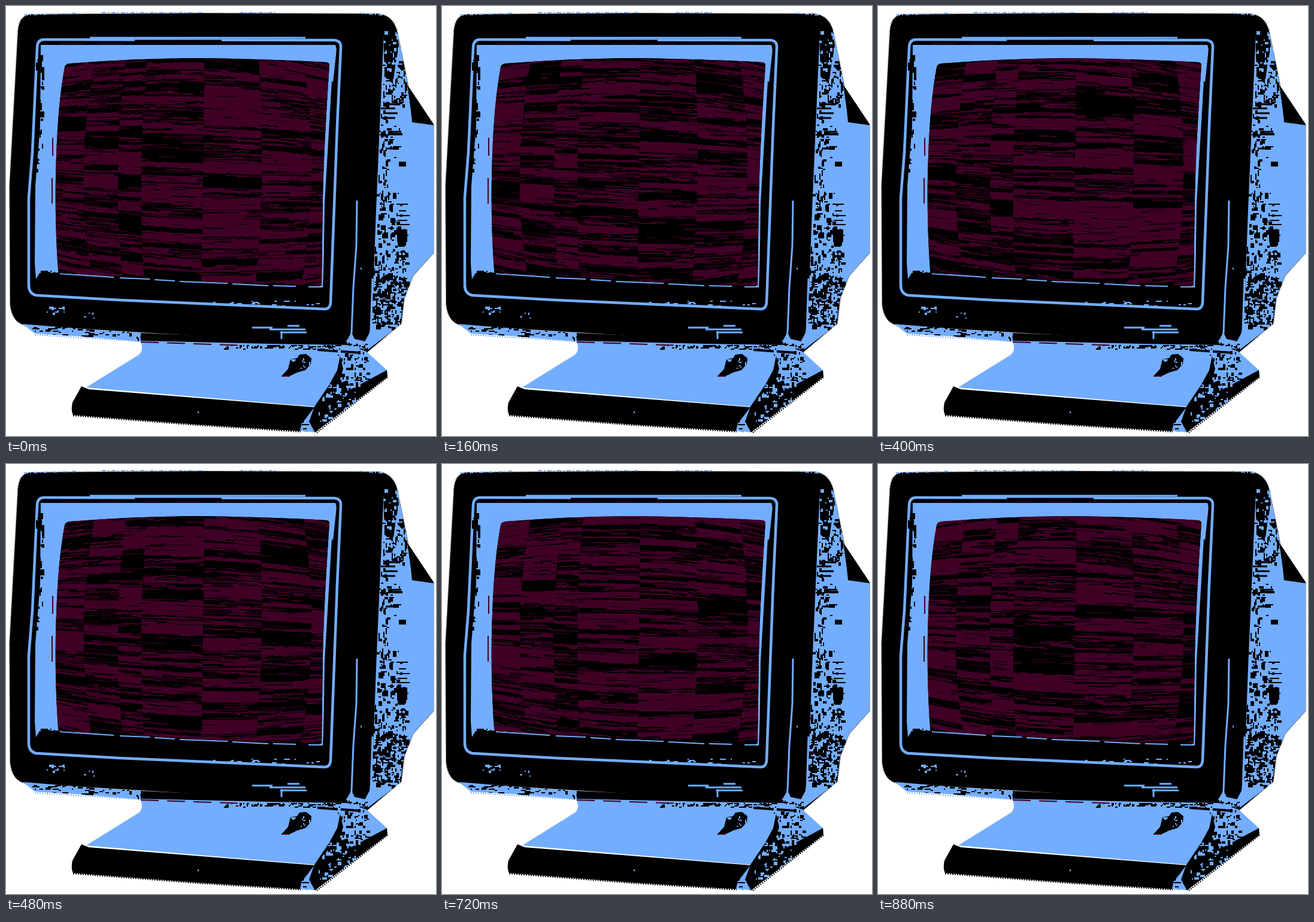
Recreate the animation shown at these times as an HTML page with a canvas. Size 718x718 px, loop 960 ms.

```html
<!DOCTYPE html>
<html>
<head>
<meta charset="utf-8">
<title>Monitor static</title>
<style>
html, body { margin: 0; width: 100%; height: 100%; overflow: hidden; background: #fff; }
canvas { display: block; width: 718px; height: 718px; }
</style>
</head>
<body>
<canvas id="stage" width="718" height="718"></canvas>
<script>
const SIZE = 718, STEP = 80, STEPS = 12;
const BLUE = '#73adff', BLACK = '#000', WINE = '#400026';
const SCREEN = new Path2D('M98 102Q99 97 106 96Q205 88 310 87Q430 88 536 94Q540 95 540 99Q531 230 529 320L527 467L350 461L90 446Q87 446 87 440C82 370 82 300 84 250Q87 160 98 102Z');

function layer() {
  const c = document.createElement('canvas');
  c.width = c.height = SIZE;
  return c.getContext('2d');
}

function seeded(a) {
  return () => {
    a = a + 0x6D2B79F5 | 0;
    let t = Math.imul(a ^ a >>> 15, 1 | a);
    t = t + Math.imul(t ^ t >>> 7, 61 | t) ^ t;
    return ((t ^ t >>> 14) >>> 0) / 4294967296;
  };
}

const base = layer();

function fill(d, color) {
  base.fillStyle = color;
  base.fill(new Path2D(d));
}

function line(d, color, width, dash = []) {
  base.strokeStyle = color;
  base.lineWidth = width;
  base.setLineDash(dash);
  base.stroke(new Path2D(d));
}

// Random blocks on a 2 px grid, kept inside a shape
function speckle(d, color, [x, y, w, h], count, maxW, maxH, seed) {
  const rnd = seeded(seed);
  const snap = n => 2 * Math.round(n / 2);
  base.save();
  base.clip(new Path2D(d));
  base.fillStyle = color;
  for (let i = 0; i < count; i++) {
    base.fillRect(snap(x + rnd() * w), snap(y + rnd() * h),
      2 + snap(rnd() * rnd() * maxW), 2 + snap(rnd() * rnd() * maxH));
  }
  base.restore();
}

function drawBody() {
  base.fillStyle = '#fff';
  base.fillRect(0, 0, SIZE, SIZE);

  const shell = 'M20 42Q22 15 42 14L330 12L620 13Q646 15 653 42L672 135L714 198V412L680 450L665 488L660 530L603 578L570 566L32 533Q10 528 7 498L6 300Z';
  line(shell, BLACK, 2, [1, 2]);
  fill(shell, BLACK);
  line('M30 15L120 12M160 11H330M390 11H450M590 12L630 15', BLUE, 2, [7, 3, 2, 4]);

  // Side and rear housing
  const side = 'M653 42L672 135L678 194L714 199V412L680 450L664 490L659 532L604 574L612 500L618 340L624 200L631 42Z';
  fill(side, BLUE);
  fill('M670 132L714 198L679 194Z', BLACK);
  fill('M630 38H652L656 66L650 100L646 130L632 118Z', BLACK);
  speckle(side, BLUE, [630, 40, 28, 95], 45, 6, 10, 3);
  speckle(side, BLACK, [628, 90, 38, 75], 75, 7, 9, 4);
  speckle(side, BLACK, [622, 160, 18, 215], 60, 7, 14, 5);
  speckle(side, BLACK, [636, 200, 24, 60], 16, 16, 6, 6);
  speckle(side, BLACK, [616, 310, 46, 70], 34, 10, 10, 7);
  speckle(side, BLACK, [614, 370, 54, 90], 120, 8, 12, 8);
  speckle(side, BLACK, [608, 450, 60, 88], 290, 8, 9, 9);
  line('M630 164H652M626 171H650M630 179H654M628 187H650M638 210H660M634 238H648', BLACK, 3);
  line('M652 331H671M656 342H668M652 350H674M654 358H670M652 365H674', BLACK, 2);
  fill('M653 373H670V394H666V402H655V394H653Z', BLACK);

  // Front edge highlights
  line('M586 325L585 400L580 470L577 545Q576 554 568 562', BLUE, 3);
  line('M612 455L609 545L600 562', BLUE, 3);
  fill('M577 545L582 556L600 560L609 545L606 570L588 577L566 564Z', BLUE);
  speckle('M560 555H610V580H560Z', BLACK, [570, 562, 32, 12], 18, 8, 3, 10);
  base.fillStyle = BLUE;
  base.fillRect(592, 437, 2, 3);

  // Bezel
  line('M52 70Q52 56 64 56L548 57Q560 58 559 70L553 200L542 495Q541 506 532 506L420 501L190 491L50 483Q38 480 38 466L38 320L44 245Z', BLUE, 4.5);
  line('M140 53H500', BLUE, 3);
  line('M215 58H360', BLACK, 3);
  fill('M58 65H550L552 72L546 128L538 260L529 470H526L524 466L90 447L56 446L50 456L48 430L49 300L57 200Z', BLUE);
  line('M60 62H548Q555 64 553 75', BLACK, 3);
  line('M90 63H530', WINE, 1, [40, 25]);
  fill('M544 125L548 130L538 300L530 466L532 330Z', BLACK);
  speckle('M50 80H64V300H50Z', BLACK, [50, 82, 10, 150], 42, 6, 22, 11);
  speckle('M48 220H56V300H48Z', BLACK, [48, 224, 5, 60], 18, 4, 18, 12);
  line('M78 220V250M77 287V330', WINE, 2);

  // Lower lip
  fill('M56 446L88 445L130 449L527 468L538 502L420 497L190 487L46 479Z', BLACK);
  line('M90 447L180 453M190 454L240 456M248 457L282 459M290 460L370 463M378 464L438 467M446 467L484 468M505 469H528', BLUE, 2);
  speckle('M52 440H92V452H52Z', BLACK, [54, 441, 34, 5], 14, 8, 4, 13);
  speckle('M300 486H540V506H300Z', BLUE, [330, 492, 200, 8], 18, 10, 2, 14);
  line('M527 380V466', BLUE, 2);

  // Buttons
  speckle('M66 498H104V518H66Z', BLUE, [68, 502, 30, 10], 14, 10, 2, 15);
  speckle('M120 506H152V534H120Z', BLUE, [122, 509, 26, 20], 4, 3, 3, 16);
  line('M411 537H445M440 540H500M470 534H490M458 545H502', BLUE, 3);
  line('M460 543V558L492 560', BLUE, 3);

  // Underside and stand
  const under = 'M28 531L150 541L360 554L570 566L602 577L636 608L637 619L516 712L494 709L498 690L515 669L134 637L222 583Q231 572 224 560L130 552L48 547Z';
  fill(under, BLUE);
  line('M48 549L130 554L222 560M226 580L140 634', BLUE, 2, [2, 2]);
  speckle(under, BLACK, [34, 534, 190, 20], 75, 13, 4, 17);
  line('M225 561L400 567', WINE, 2, [30, 14]);
  fill('M225 546L570 561L570 566L440 564L225 559Z', BLACK);
  speckle(under, BLACK, [362, 565, 200, 7], 70, 12, 2, 18);
  line('M520 574L590 579', BLACK, 4, [34, 5]);
  fill('M460 618L471 606L475 590L486 588L490 582L501 581L510 588L509 598L500 608L486 612L476 617Z', BLACK);
  speckle('M458 576H512V620H458Z', BLUE, [476, 582, 32, 24], 12, 5, 4, 19);
  line('M460 618H474', WINE, 2);

  // Stand base
  fill('M126 635L138 640L515 670L498 692L492 710L320 699L112 683Q108 675 111 662Z', BLACK);
  line('M112 684L320 700L492 711', BLACK, 2, [2, 2]);
  fill('M515 669L540 632L553 608L558 584L563 606L556 630L570 625L576 640L636 608L637 619L516 712L506 694Z', BLACK);
  fill('M563 600L590 584L622 605L596 622L572 626Z', BLUE);
  speckle(under, BLUE, [520, 630, 70, 66], 80, 9, 6, 20);
  speckle(under, BLACK, [554, 574, 50, 60], 60, 8, 8, 21);
  fill('M494 696H508L504 712L491 709Z', BLUE);
  line('M494 699H506M496 706H502', BLACK, 2);
  line('M637 620L518 713', BLACK, 2, [2, 2]);
  base.fillStyle = BLUE;
  base.fillRect(320, 677, 2, 3);
}

// Flat static: columns of bars, some split into thin streaks
function flatStatic(seed) {
  const ctx = layer(), rnd = seeded(seed);
  const edges = [60, 130, 187, 226, 329, 427, 510, 580];
  const bar = (x, y, w, h, on) => {
    ctx.fillStyle = on ? WINE : BLACK;
    ctx.fillRect(Math.round(x), y, Math.round(w), h);
  };
  for (let i = 0; i < edges.length - 1; i++) {
    const x = edges[i], w = edges[i + 1] - x;
    for (let y = 60; y < 500;) {
      const h = Math.round(rnd() < .2 ? 9 + rnd() * 16 : 3 + rnd() * 7);
      const mode = rnd();
      bar(x, y, w, h, mode < .42);
      if (mode > .62) {
        for (let r = 0; r < h; r += 2) {
          for (let p = 0; p < w;) {
            const len = Math.min(w - p, 8 + rnd() * 55);
            bar(x + p, y + r, len, 1 + (rnd() < .6), rnd() < .48);
            p += len;
          }
        }
      }
      y += h;
    }
  }
  for (let i = 0; i < 750; i++) {
    const x = 70 + rnd() * 480, y = 60 + Math.floor(rnd() * 440);
    bar(x, y, 8 + rnd() * 42, 1 + (rnd() < .25), rnd() < .46);
  }
  return ctx.canvas;
}

// Bulge the static to follow the curved glass
function glassStatic(seed) {
  const flat = flatStatic(seed), rows = layer(), out = layer();
  rows.imageSmoothingEnabled = out.imageSmoothingEnabled = false;
  for (let y = 60; y < 500; y++) {
    const v = (y - 277) / 210, s = 1 - .09 * v * v, mid = 327 - 3 * v;
    rows.drawImage(flat, 0, y, SIZE, 1, mid - 327 * s, y, SIZE * s, 1);
  }
  out.clip(SCREEN);
  out.fillStyle = BLACK;
  out.fillRect(0, 0, SIZE, SIZE);
  for (let x = 80; x < 542; x++) {
    const u = (x - 325) / 225, s = 1 - .12 * u * u;
    const mid = 277 + .035 * (x - 310);
    out.drawImage(rows.canvas, x, 60, 1, 440, x, Math.round(mid - 217 * s), 1, Math.round(440 * s));
  }
  return out.canvas;
}

drawBody();
const glass = Array.from({ length: STEPS }, (_, i) => glassStatic(101 + i * 37));
const stage = document.getElementById('stage').getContext('2d');
let shown = -1;

function tick() {
  const step = Math.floor(performance.now() / STEP) % STEPS;
  if (step !== shown) {
    shown = step;
    stage.drawImage(base.canvas, 0, 0);
    stage.drawImage(glass[step], 0, 0);
  }
  requestAnimationFrame(tick);
}
tick();
</script>
</body>
</html>
```
